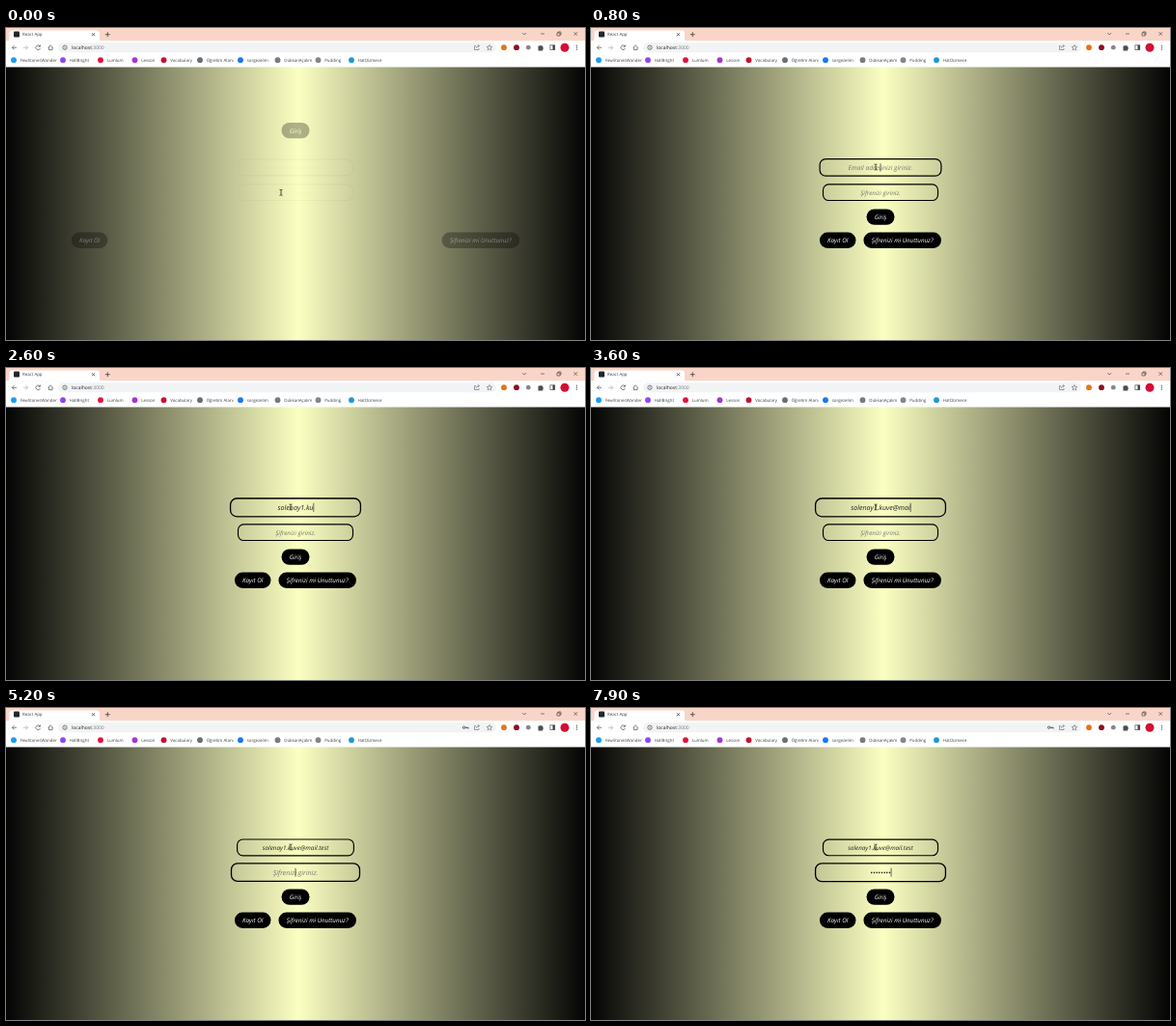
An HTML page for the animation above (8000 ms loop, 600 by 323 pixels).

```html
<!DOCTYPE html>
<html lang="tr">
<head>
<meta charset="utf-8">
<title>React App</title>
<style>
html, body { margin: 0; width: 100%; height: 100%; overflow: hidden; }
svg { display: block; width: 100%; height: 100%; }
text { font-family: 'Open Sans', 'Noto Sans', sans-serif; text-rendering: geometricPrecision; white-space: pre; }
.ui { font-size: 4.4px; fill: #3c4043; }
.form { font-size: 6.25px; font-style: italic; text-anchor: middle; }
.line { fill: none; stroke: #5f6368; stroke-width: .8; }
.field rect { fill: none; stroke: #000; stroke-width: 1.15; }
</style>
</head>
<body>
<svg viewBox="0 0 600 323" preserveAspectRatio="none">
  <defs>
    <linearGradient id="glow">
      <stop offset="0" stop-color="#040404"/>
      <stop offset=".505" stop-color="#fbffc1"/>
      <stop offset="1" stop-color="#040404"/>
    </linearGradient>
  </defs>
  <rect width="600" height="323" fill="url(#glow)"/>

  <!-- Browser window -->
  <rect width="600" height="14" fill="#f9d5c8"/>
  <path d="M1 13.5Q3.5 13.5 3.5 11V5Q3.5 2.5 6 2.5H94Q97 2.5 97 5V11Q97 13.5 99.5 13.5Z" fill="#fff"/>
  <rect y="13.2" width="600" height="27.3" fill="#fff"/>
  <rect x="8" y="3.6" width="6" height="6" rx="1" fill="#22272e"/>
  <text class="ui" x="17" y="8.3">React App</text>
  <g class="line">
    <path d="M89 5.2l3 3m0-3l-3 3M102.800 6.700h5m-2.500-2.500v5" stroke="#3c4043"/>
    <path d="M535.200 5l2 2 2-2M554 6h4M571 5h3v3h-3zM572 5v-1h3v3h-1M588.500 4.200l3.600 3.600m0-3.600l-3.600 3.600" stroke="#333" stroke-width=".6"/>
    <path d="M11 20.300H6.300m2.200-2.200l-2.200 2.200 2.200 2.200"/>
    <path d="M18 20.300h4.700m-2.200-2.200l2.200 2.200-2.200 2.200" stroke="#b5b7ba"/>
    <path d="M35 18.800A2.300 2.300 0 1 0 35.400 21M35.400 17.500v1.800h-1.800"/>
    <path d="M43.700 20.200l2.500-2.300 2.500 2.300M44.400 20v2.600h3.600v-2.600"/>
  </g>
  <rect x="54" y="15.200" width="454" height="10" rx="5" fill="#f1f3f4"/>
  <g class="line" stroke-width=".6">
    <circle cx="61" cy="20.200" r="2.200"/>
    <path d="M61 19.900v1.500M61 18.700v.5"/>
    <path d="M487 18.500h-1.500v4h4.500v-1.500M487 21q.2-2.500 3.500-2.500m-1.300-1.300l1.300 1.300-1.300 1.300" stroke-width=".6"/>
    <path d="M501 17.500l.8 1.800 2 .2-1.500 1.300.5 2-1.800-1-1.800 1 .5-2-1.500-1.300 2-.2z" stroke-width=".6"/>
  </g>
  <text class="ui" x="68" y="22.100" style="font-size:5px;fill:#202124">localhost<tspan fill="#777b80">:3000</tspan></text>
  <g id="key" fill="none" stroke="#4a4d51" stroke-width=".9">
    <circle cx="474.600" cy="20.200" r="1.200"/><path d="M475.800 20.200h3.300v1.300m-1.500-1.300v1"/>
  </g>
  <circle cx="516" cy="20.200" r="2.900" fill="#e2761b"/>
  <circle cx="529" cy="20.200" r="2.900" fill="#8c1022"/>
  <circle cx="541.300" cy="20.200" r="2.400" fill="#85888c"/>
  <path d="M551.500 18.600h1.500a1.100 1.100 0 0 1 2 0h1.300v1.500a1.100 1.100 0 0 1 0 2v1.300h-4.800z" fill="#4a4d51"/>
  <rect x="563.900" y="17.800" width="4.800" height="4.800" class="line"/><path d="M566.500 17.800h2.200v4.800h-2.200z" fill="#3c4043"/>
  <circle cx="579" cy="20.200" r="4.500" fill="#d20f35"/>
  <g fill="#4a4d51"><circle cx="591.500" cy="18.200" r=".6"/><circle cx="591.500" cy="20.200" r=".6"/><circle cx="591.500" cy="22.200" r=".6"/></g>
  <g id="bookmarks"></g>

  <g id="form"></g>
  <path id="pointer" d="M-1.500-3Q0-3 0-2.200 0-3 1.500-3M0-2.200V2.200M-1.500 3Q0 3 0 2.200 0 3 1.500 3" fill="none" stroke="#222" stroke-width=".8"/>
</svg>
<script>
const LOOP = 8000, STEP = 100;
const EMAIL = 'solenay1.kuve@mail.test';
const EMAIL_TIMES = [1300, 1400, 1500, 1600, 1800, 1900, 2100, 2200, 2400, 2500, 2600, 2800,
  2900, 3100, 3300, 3400, 3600, 3700, 3900, 4200, 4300, 4500, 4700];
const PASSWORD_TIMES = [5700, 5800, 5900, 6100, 6300, 7400, 7600, 7900];
const EMAIL_FOCUS = 670, PASSWORD_FOCUS = 4900;

const $ = id => document.getElementById(id);
const clamp = x => Math.min(1, Math.max(0, x));
const mix = (a, b, p) => a + (b - a) * p;

function add(parent, tag, attrs, text = '') {
  const el = document.createElementNS('http://www.w3.org/2000/svg', tag);
  set(el, attrs);
  el.textContent = text;
  return parent.appendChild(el);
}
function set(el, attrs) {
  for (const name in attrs) el.setAttribute(name, attrs[name]);
}

// CSS "ease": cubic-bezier(.25, .1, .25, 1)
function ease(x) {
  x = clamp(x);
  const bezier = (a, b, s) => 3 * a * s * (1 - s) ** 2 + 3 * b * s * s * (1 - s) + s ** 3;
  let low = 0, high = 1;
  for (let i = 0; i < 24; i++) {
    const mid = (low + high) / 2;
    if (bezier(.25, .25, mid) < x) low = mid; else high = mid;
  }
  return x === 1 ? 1 : bezier(.1, 1, low);
}

const bookmarks = [
  [8, '#1d9bf0', 'FewStonesWander'], [59, '#8f45f5', 'HallBright'], [98, '#e0143c', 'Lumlum'],
  [133.500, '#a435d0', 'Lesson'], [163.500, '#c4122f', 'Vocabulary'], [201, '#6a6e73', 'Öğretim Alanı'],
  [243, '#1877f2', 'sorgezelim'], [281.500, '#777a7e', 'DükkanAçalım'], [323.500, '#85858a', 'Pudding'],
  [358, '#2196d8', 'HatDizmece']
];
for (const [x, fill, label] of bookmarks) {
  add($('bookmarks'), 'circle', { cx: x, cy: 33.200, r: 2.900, fill });
  add($('bookmarks'), 'text', { class: 'ui', x: x + 6.700, y: 34.900 }, label);
}

function makeField(cy, placeholder) {
  const group = add($('form'), 'g', { class: 'field' });
  add(group, 'rect', { x: -59.500, y: -8.300, width: 119, height: 16.600, rx: 5.800 });
  const text = add(group, 'text', { class: 'form', y: 2.400 });
  const caret = add(group, 'path', { stroke: '#222', 'stroke-width': .6 });
  return { cy, placeholder, group, text, caret };
}
const emailField = makeField(144.400, 'Email adresinizi giriniz.');
const passwordField = makeField(170.200, 'Şifrenizi giriniz.');

function drawField(field, value, scale, opacity, caretOn) {
  set(field.group, { transform: `translate(300 ${field.cy}) scale(${scale})`, opacity });
  set(field.text, { fill: value ? '#222' : '#757575' });
  field.text.textContent = value || field.placeholder;
  const x = value ? field.text.getComputedTextLength() / 2 + .3 : 0;
  set(field.caret, { d: `M${x} -4V4`, visibility: caretOn ? 'visible' : 'hidden' });
}

const buttons = [
  // label, centre x, centre y, width, offset at the start of the entrance
  ['Giriş', 300, 195.600, 29, 0, -127],
  ['Kayıt Ol', 255.700, 219.800, 37.500, -240, 0],
  ['Şifrenizi mi Unuttunuz?', 322.700, 219.800, 80.500, 240, 0]
].map(([label, x, y, width, dx, dy]) => {
  const group = add($('form'), 'g', {});
  add(group, 'rect', { x: -width / 2, y: -8.200, width, height: 16.400, rx: 8.200 });
  add(group, 'text', { class: 'form', y: 2.400, fill: '#fff' }, label);
  return { group, x, y, dx, dy };
});

const typed = (times, t) => times.filter(time => time <= t).length;

// The caret stays lit for half a second after each key, then blinks.
function caretLit(t, focus, times) {
  const last = Math.max(focus, ...times.filter(time => time <= t));
  return t >= focus && (t - last) % 1000 < 500;
}

function draw(t) {
  const entrance = ease((t + 200) / 1000);
  for (const { group, x, y, dx, dy } of buttons) {
    const rest = 1 - entrance;
    set(group, { transform: `translate(${x + dx * rest} ${y + dy * rest})`, opacity: entrance });
  }

  const toPassword = ease((t - PASSWORD_FOCUS) / 500);
  const toEmail = ease((t - EMAIL_FOCUS) / 500) - toPassword;
  const onPassword = t >= PASSWORD_FOCUS;
  const fade = entrance ** 3;
  drawField(emailField, EMAIL.slice(0, typed(EMAIL_TIMES, t)), 1 + .133 * toEmail, fade,
    !onPassword && caretLit(t, EMAIL_FOCUS, EMAIL_TIMES));
  drawField(passwordField, '•'.repeat(typed(PASSWORD_TIMES, t)), 1 + .133 * toPassword, fade,
    caretLit(t, PASSWORD_FOCUS, PASSWORD_TIMES));
  set($('key'), { visibility: onPassword ? 'visible' : 'hidden' });

  const move = ease((t - 50) / 550);
  set($('pointer'), { transform: `translate(${mix(285, 295, move)} ${mix(170.300, 144, move)})` });
}

const start = performance.now();
function tick() {
  const t = (performance.now() - start) % LOOP;
  draw(Math.floor(t / STEP) * STEP);
  requestAnimationFrame(tick);
}
tick();
</script>
</body>
</html>
```
